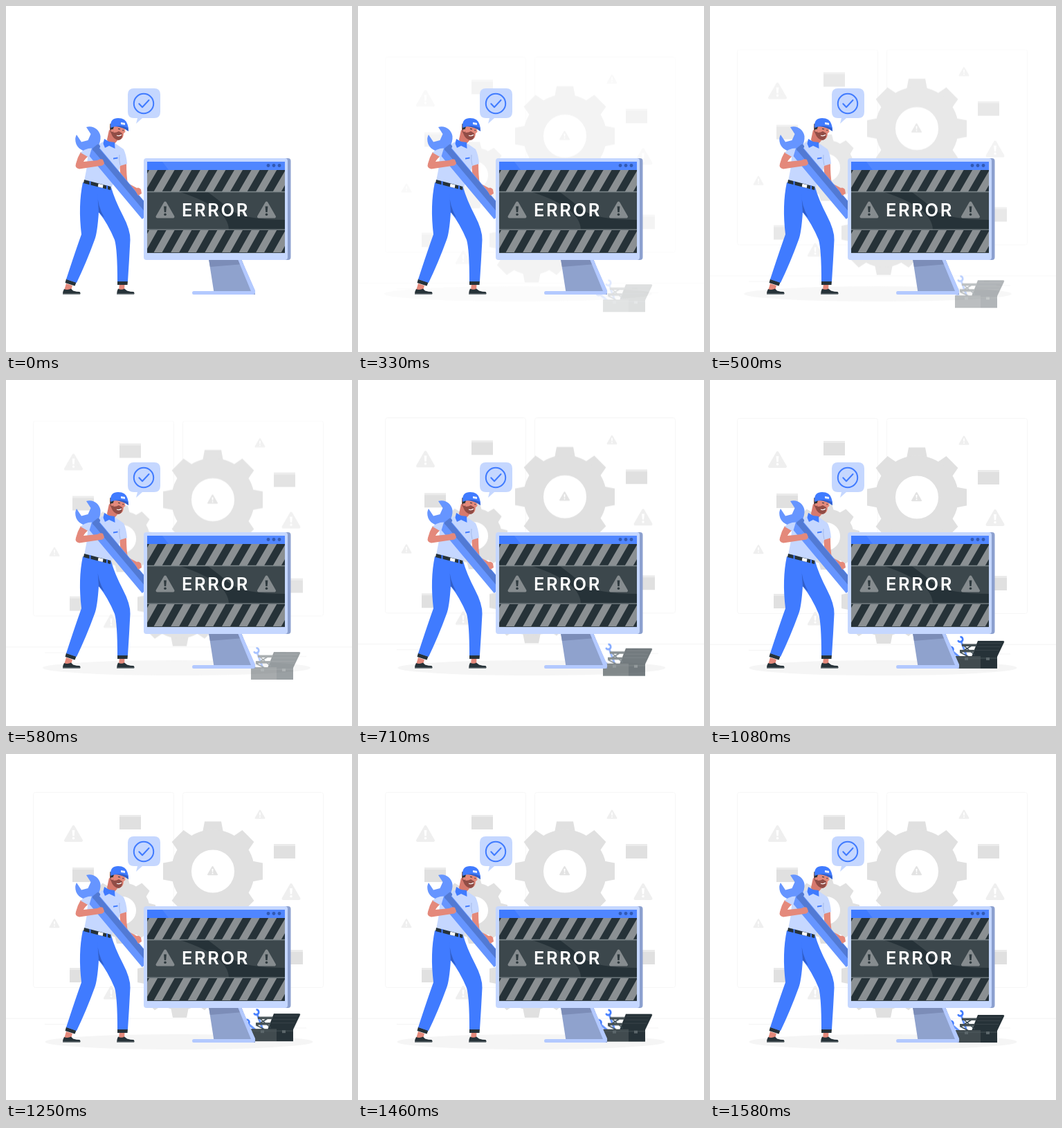
Write an HTML page that moves like this. It is 500x500 px and loops after 1.62 s.

```html
<!DOCTYPE html>
<html lang="en">
<head>
<meta charset="utf-8">
<title>Repair</title>
<style>
html, body { margin: 0; width: 100%; height: 100%; overflow: hidden; background: #fff; }
svg { display: block; width: 100%; height: 100%; }
text { font: 600 25.5px Inter, "Open Sans", sans-serif; letter-spacing: 2.6px; fill: #fff; }
</style>
</head>
<body>
<svg viewBox="0 0 500 500">
  <defs>
    <clipPath id="top"><rect x="204" y="237" width="199" height="31"/></clipPath>
    <clipPath id="low"><rect x="204" y="324" width="199" height="32"/></clipPath>
    <clipPath id="scr"><rect x="204" y="225" width="199" height="132"/></clipPath>
  </defs>

  <g id="back">
    <g fill="none" stroke="#f6f6f6">
      <rect x="39.5" y="55.5" width="203" height="282" rx="3"/>
      <rect x="255.5" y="55.5" width="203" height="282" rx="3"/>
      <path stroke="#efefef" stroke-width=".7" d="M0 382.3H500M56 390.5H92M414 396H434M396 390H404"/>
    </g>
    <g id="gears" fill="#e0e0e0"></g>
    <g id="panes"></g>
    <g id="signs"></g>
  </g>

  <ellipse id="shade" cx="250" cy="416" rx="193.5" ry="11" fill="#f5f5f5"/>

  <g id="box">
    <path d="M387 377H423Q426 377 425 379L415 400H378Z" fill="#263238"/>
    <path d="M388 380.5H421M386 385.5H419M384 390.5H417" stroke="#3b464b" stroke-width=".9"/>
    <g fill="none" stroke-linecap="round">
      <path d="M363 378L370 397M349 391L361 401" stroke="#6695ff" stroke-width="3"/>
      <path d="M358.3 376.2A3.6 3.6 0 1 0 361.5 371.2M344.8 391.2A3.6 3.6 0 1 0 346.4 386" stroke="#407bff" stroke-width="2.6" stroke-linecap="butt"/>
      <path d="M368 385L382 397M378 384L362 394L374 400" stroke="#37474f" stroke-width="1.5"/>
    </g>
    <path d="M364 381.5H386L384.5 385H364ZM361 390H383L381.5 393.5H361Z" fill="#455054"/>
    <path d="M354 399H391V417H354Z" fill="#414b4f"/>
    <path d="M391 399H415V417H391Z" fill="#263238"/>
    <path d="M354 402H415" stroke="#556064" stroke-width=".7"/>
    <path d="M368 401h5v4h-5ZM399 401h5v4h-5Z" fill="#5c676b"/>
  </g>

  <g id="bubble">
    <path d="M185 119H214Q223 119 223 128V153Q223 162 214 162H197L188 170L190 162H185Q176 162 176 153V128Q176 119 185 119Z" fill="#c5d7ff"/>
    <g fill="none" stroke="#407bff" stroke-width="2">
      <circle cx="199" cy="141" r="14.2"/>
      <path d="M192.3 141.2L197 146.3L206.5 136" stroke-linecap="round" stroke-linejoin="round"/>
    </g>
  </g>

  <g id="worker">
    <path d="M87 401L96 404L94 411H84ZM164 401H171.5L171 411H163Z" fill="#e4897b"/>
    <g fill="#263238">
      <path d="M84 409Q89 411 94 408.5L97 411.5Q102 413 106.5 413Q108.5 415 107 417H82Q82 412 84 409Z"/>
      <path d="M162 408.5Q167 411 171 408.5L175 411.5Q180 413 184.5 413Q186.5 415 185 417H160Q160 412 162 408.5Z"/>
      <path d="M87 394.5L101.5 399.5L99.5 404.5L85.5 400ZM161 397H176L175.5 403H161Z"/>
    </g>
    <path d="M82 416.2H107.5M160 416.2H185.5M97 411L100 409.8M175 411L178 409.8" stroke="#fff" stroke-width=".6"/>
    <path d="M111 255L152 262Q157 280 169 303Q180 324 179.5 338Q178 368 176 398H161Q161 352 157 338Q147 314 134 298Q132 328 128 338Q116 371 102 400L87 395Q100 355 109 330Q104 288 111 255Z" fill="#407bff"/>
    <path d="M132 270Q132 288 142 306L134 298Z" fill="#315fc9"/>
    <path d="M164 226L174 228Q174 246 176 256L191 264L195 271L187 273L172 263Q165 254 164 226Z" fill="#e4897b"/>
    <path d="M124 206L142 195L157 198L170 207Q174 215 175 228L165 231Q162 244 152 263L113 253Q117 236 118 219Z" fill="#c5d7ff"/>
    <path d="M165 230Q163 222 164 215" fill="none" stroke="#9db3e5" stroke-width=".8"/>
    <path d="M155 219.5L161.5 218.5V220.4L155 221.4Z" fill="#407bff"/>
    <path d="M113 251L151.5 261L151 266L112 256Z" fill="#263238"/>
    <path d="M133.5 256.7L140.5 258.5L139.7 263L132.8 261.3Z" fill="#fff"/>
    <path d="M121.5 253V259M146 259.5V265" stroke="#407bff" stroke-width="2"/>
    <path d="M149 179L165 190L156 200Q147 199 146 193Z" fill="#d6796d"/>
    <path d="M142 192L149 196L157 197L157.5 206L149 202L143 205L140.5 199Z" fill="#407bff"/>
    <path d="M153 170L171 175L172.5 182L170 184Q170 191 165 193Q157 193 153 184Z" fill="#e4897b"/>
    <path d="M150.5 171L157 172L154.5 178L155.5 183Q160 183 163 181L168 184Q169 192 163 194Q155 193 152 184Q149 180 150.5 171Z" fill="#914d46"/>
    <path d="M150.5 170L157 171L154 180L151 179Z" fill="#263238"/>
    <path d="M160 187Q164 188.5 167 186" fill="none" stroke="#fff" stroke-width="1.2"/>
    <path d="M162 177.5L165 178M168.5 179.5L170 180" stroke="#263238" stroke-width="1.2"/>
    <circle cx="153.5" cy="180" r="2" fill="#e4897b"/>
    <path d="M151 173Q151 162 162 162Q173 162 175.5 171Q177.5 176 177 181Q170 175 161 174Q156 174 151 176Z" fill="#407bff"/>
    <path d="M158 174Q167 172 176 176L177 181Q169 175 158 174Z" fill="#315fc9"/>
    <path d="M166 168L172 169V172L166 171Z" fill="#e9f0ff"/>

    <path d="M122 204L204 302" stroke="#6695ff" stroke-width="19"/>
    <path d="M131 208L205 296" stroke="#527ad4" stroke-width="8.5" stroke-linecap="round"/>
    <path d="M116 175C125 172 135 178 136.5 188Q137 196 133 203L123 211C112 211 102 206 100.5 196Q99.5 190 102 186L109 196.5L118.5 194L122.5 185Z" fill="#6695ff"/>
    <path d="M128 207L133 203" stroke="#527ad4" stroke-width="6" stroke-linecap="round"/>

    <path d="M108 211L120 216Q114 221 112 225L132 223Q137 220 140 222L142 227Q141 231 136 231L106 235.5Q99 234 101 228Q103 219 108 211Z" fill="#e4897b"/>
    <path d="M124 205.5Q113 206 108 212L120 219Z" fill="#c5d7ff"/>
    <path d="M186 265Q191 260 195 265L196 271L191 274Z" fill="#e4897b"/>
  </g>

  <g id="monitor">
    <path d="M293 366H340L360 412V417H301Z" fill="#8fa2cd"/>
    <path d="M293 366H340L343 373L295 377Z" fill="#7c8db8"/>
    <path d="M335 366H340L360 411Q361 417 356 417H271Q269 417 269 414.5T271 412H354Z" fill="#b3c9ff"/>
    <rect x="204" y="220" width="207.5" height="147" rx="4" fill="#8ca0cf"/>
    <rect x="199" y="220" width="208" height="147" rx="4" fill="#c5d7ff"/>
    <g clip-path="url(#scr)">
      <rect x="204" y="225" width="199" height="132" fill="#3c474c"/>
      <path d="M252 269H292Q308 281 325 295Q345 309 403 309V324H322Q322 292 252 269Z" fill="#263238"/>
      <rect x="204" y="225" width="199" height="12" fill="#5086ff"/>
      <path d="M204 225H226L235 237H204Z" fill="#407bff"/>
    </g>
    <g id="bars"></g>
    <path d="M204 268.5H403M204 323.2H403" stroke="#7d868a" stroke-width="1.3"/>
    <g fill="#3159b3">
      <circle cx="379" cy="230.5" r="2.4"/><circle cx="387" cy="230.5" r="2.4"/><circle cx="395" cy="230.5" r="2.4"/>
    </g>
    <g id="alerts"></g>
    <text x="254" y="304">ERROR</text>
  </g>
</svg>
<script>
const $ = id => document.getElementById(id);

// Toothed wheel with a round hole
function gear(cx, cy, tip, body, hole, w) {
  const h = w / 2;
  let s = '';
  for (let a = 0; a < 360; a += 45)
    s += `<path d="M${-h} ${-tip}H${h}L${h + 3} ${-body + 4}H${-h - 3}Z" transform="rotate(${a})"/>`;
  const ring = (body + hole) / 2;
  return `<g transform="translate(${cx} ${cy})">${s}<circle r="${ring}" fill="none" stroke="#e0e0e0" stroke-width="${body - hole}"/></g>`;
}

const pane = (x, y) =>
  `<path d="M${x} ${y}h31v21h-31Z" fill="#e0e0e0"/><path d="M${x} ${y}h31v3h-31Z" fill="#ebebeb"/>`;

// Rounded warning triangle; y is its top, w its width
function sign(x, y, w, fill, mark) {
  const k = w / 27;
  return `<g transform="translate(${x} ${y}) scale(${k})">
    <path d="M0 2L11.5 22H-11.5Z" fill="${fill}" stroke="${fill}" stroke-width="4" stroke-linejoin="round"/>
    <path d="M-1.9 7H1.9L1.2 15.5H-1.2Z" fill="${mark}"/><circle cy="18.7" r="1.8" fill="${mark}"/></g>`;
}

function stripes(y, h, clip) {
  let d = '';
  for (let x = 207; x < 430; x += 24.6) d += `M${x} ${y}h12l-18 ${h}h-12Z`;
  return `<g clip-path="url(#${clip})"><path d="M204 ${y}h199v${h}h-199Z" fill="#263238"/><path d="${d}" fill="#8b9093"/></g>`;
}

$('gears').innerHTML = gear(299, 169.5, 72, 60, 31, 24) + gear(168, 226, 48, 40, 20, 16) + gear(251, 320, 61, 50, 26, 20);
$('panes').innerHTML = [[164, 88], [96, 164], [387, 130], [398, 283], [92, 309]].map(p => pane(...p)).join('');
$('signs').innerHTML = [[97.5, 103, 27], [412, 187, 27], [367, 80.5, 15], [70, 238, 15], [152, 335, 22], [298.5, 162, 15]]
  .map(([x, y, w], i) => sign(x, y, w, i < 5 ? '#efefef' : '#e3e3e3', '#fff')).join('');
$('bars').innerHTML = stripes(237, 31, 'top') + stripes(324, 32, 'low');
$('alerts').innerHTML = [230, 376.5].map(x => sign(x, 282.5, 27, '#868c8f', '#2f3a3f')).join('');

const loop = 1620;
const easing = 'cubic-bezier(.36,-.01,.5,1.38)';

function enter(id, from, ms) {
  const end = { opacity: 1, transform: 'translate(0px, 0px)' };
  $(id).animate([
    { opacity: 0, transform: from, easing },
    { ...end, offset: ms / loop },
    end
  ], { duration: loop, iterations: Infinity });
}

enter('back', 'translate(0px, 30px)', 1000);
enter('shade', 'translate(-30px, 0px)', 1000);
enter('box', 'translate(0px, 30px)', 1580);
</script>
</body>
</html>
```
